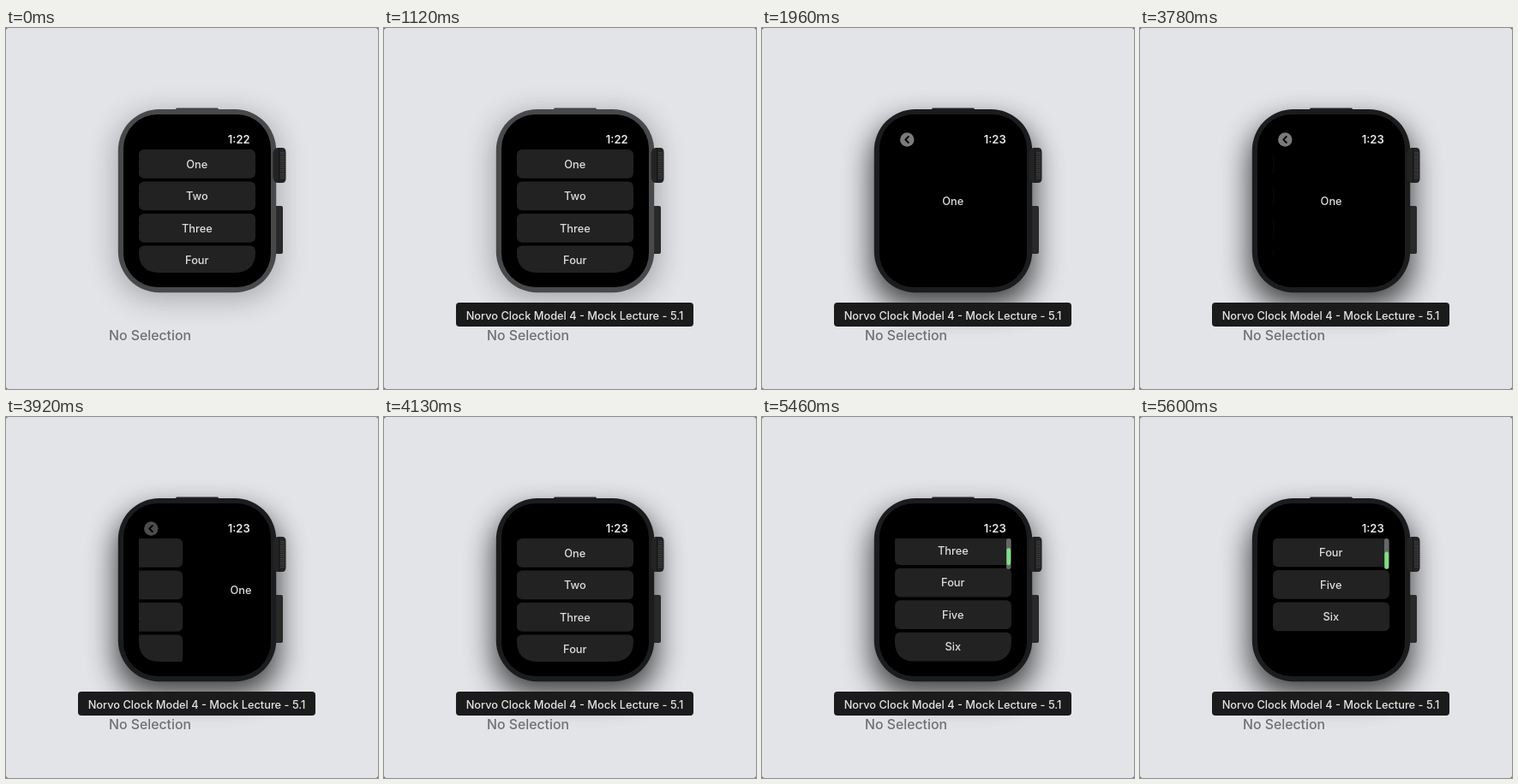
These frames come from a looping animation (434 by 422 pixels, 5740 ms). An HTML page:

```html
<!DOCTYPE html>
<html lang="en">
<head>
<meta charset="utf-8">
<title>Wrist list demo</title>
<style>
html, body { margin: 0; width: 100%; height: 100%; overflow: hidden; background: #e3e4e8; }
svg { display: block; width: 434px; height: 422px; font-family: Inter, Roboto, sans-serif; }
.row { font-size: 12.8px; font-weight: 500; fill: #dededf; text-anchor: middle; }
</style>
</head>
<body>
<svg viewBox="0 0 434 422">
  <defs>
    <filter id="soft" x="-50%" y="-50%" width="200%" height="200%"><feGaussianBlur stdDeviation="17"/></filter>
    <filter id="edge"><feGaussianBlur stdDeviation=".6"/></filter>
    <clipPath id="view"><path d="M155 142H291V262Q291 286 266 286H180Q155 286 155 262Z"/></clipPath>
    <pattern id="ridges" width="6" height="2.500" patternUnits="userSpaceOnUse"><path d="M0 .6H6" stroke="#4b4b4c" stroke-width=".8"/></pattern>
  </defs>
  <path d="M0 0H434V422H0Z" fill="#55565a"/>
  <rect width="434" height="422" rx="3" fill="#e3e4e8"/>
  <rect id="shade" x="128" width="190" height="215" rx="46" filter="url(#soft)"/>
  <text x="120" y="365" font-size="15.800" font-weight="450" fill="#6f7073">No Selection</text>

  <rect id="top" x="198" y="93.500" width="50" height="5" rx="1.500"/>
  <rect x="312" y="208" width="11" height="56" rx="2" fill="#29292a"/>
  <rect id="rim" x="130.800" y="95" width="184.400" height="214.200" rx="48" filter="url(#edge)"/>
  <rect x="137" y="101" width="172" height="202" rx="40"/>
  <path d="M311.500 146Q313 140 317 140H322Q326.500 140 326.500 145V176Q326.500 181 322 181H317Q313 181 311.500 175Z" fill="#232324"/>
  <rect x="320" y="145" width="5" height="31" fill="url(#ridges)"/>
  <path d="M318.500 141V180" stroke="#151516"/>

  <text id="clock" x="284.700" y="135" font-size="13" font-weight="600" fill="#e6e6e6" text-anchor="end"></text>
  <g id="back">
    <circle cx="169.300" cy="130.500" r="8.200" fill="#7b7b7c"/>
    <path d="M170.800 127L167.300 130.500L170.800 134" fill="none" stroke="#000" stroke-width="1.800" stroke-linecap="round" stroke-linejoin="round"/>
  </g>
  <g clip-path="url(#view)">
    <g id="list"></g>
    <text id="detail" class="row" x="222.800" y="206.700">One</text>
  </g>
  <g id="bar">
    <rect x="285" y="142" width="5.500" height="36" rx="2.700" fill="#666768"/>
    <rect id="thumb" x="285.400" width="4.700" height="20" rx="2.300" fill="#7fdf82"/>
  </g>
  <g id="tip">
    <rect x="84" y="321" width="277" height="28" rx="4" fill="#1b1b1c"/>
    <text x="222.500" y="341" font-size="12.800" font-weight="450" fill="#e4e4e5" text-anchor="middle">Norvo Clock Model 4 - Mock Lecture - 5.1</text>
  </g>
</svg>
<script>
const LOOP = 5740, STEP = 70, PITCH = 37.5, WIDTH = 136, SCROLL = 113;
const $ = id => document.getElementById(id);
const set = (id, attrs) => { for (const k in attrs) $(id).setAttribute(k, attrs[k]); };

// Smooth 0..1 progress over a time span
const ease = (t, from, to) => {
  const x = Math.min(1, Math.max(0, (t - from) / (to - from)));
  return x * x * (3 - 2 * x);
};

$('list').innerHTML = ['One', 'Two', 'Three', 'Four', 'Five', 'Six'].map((name, i) =>
  `<rect x="155" y="${142 + i * PITCH}" width="${WIDTH}" height="33.800" rx="6" fill="#222223"/>
   <text class="row" x="222.800" y="${163.500 + i * PITCH}">${name}</text>`).join('');

function draw(t) {
  const active = t >= 1190;
  const slide = ease(t, 1680, 1960) - ease(t, 3770, 4130);
  const scroll = t < 5320 ? 0 : ease(t, 5223, 5600) * SCROLL;

  set('shade', active ? { y: 110, opacity: .72 } : { y: 101, opacity: t >= 1120 ? .3 : .27 });
  set('rim', { fill: active ? '#1b1c1d' : '#48494b' });
  set('top', { fill: active ? '#242526' : '#414244' });
  set('tip', { opacity: t >= 280 ? 1 : 0 });
  set('back', { opacity: slide });
  set('list', { transform: `translate(${-slide * WIDTH} ${-scroll})` });
  set('detail', { transform: `translate(${(1 - slide) * WIDTH})` });
  set('bar', { opacity: scroll ? 1 : 0 });
  set('thumb', { y: 143.5 + scroll / SCROLL * 14 });
  $('clock').textContent = t < 1330 ? '1:22' : '1:23';
}

const start = performance.now();
function tick() {
  const t = (performance.now() - start) % LOOP;
  draw(Math.floor(t / STEP) * STEP);
  requestAnimationFrame(tick);
}
tick();
</script>
</body>
</html>
```
